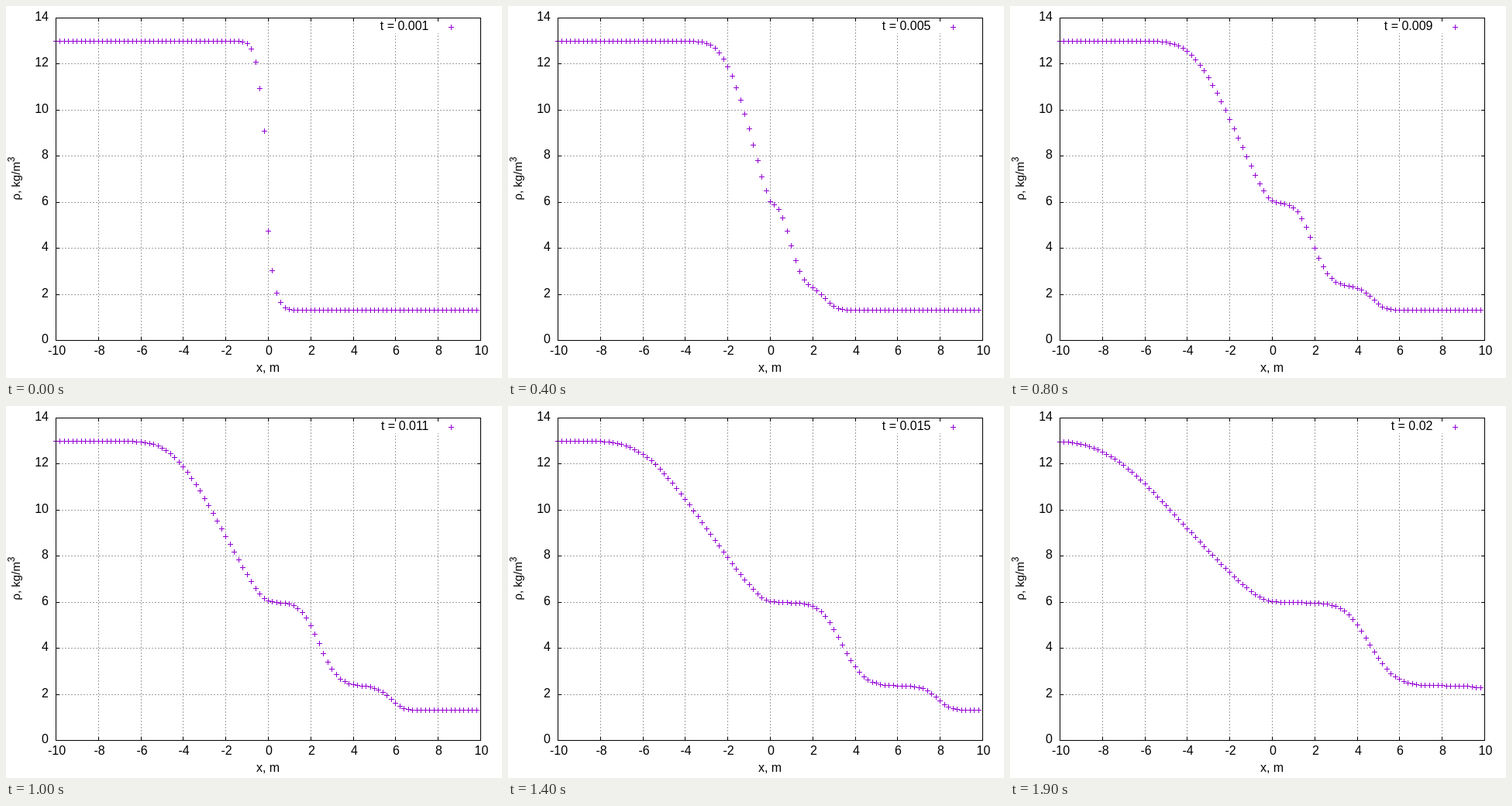
Write an HTML page that moves like this. It is 640 px wide and 480 px high and loops after 2 s.

```html
<!DOCTYPE html>
<html lang="en">
<head>
<meta charset="utf-8">
<title>Shock tube density</title>
<style>
  html, body { margin: 0; width: 100%; height: 100%; overflow: hidden; background: #fff; }
  svg { display: block; }
  text { font: 16px "Liberation Sans", Arial, sans-serif; fill: #000; }
  path { fill: none; stroke-width: 1; shape-rendering: crispEdges; }
  .end { text-anchor: end; }
  .mid { text-anchor: middle; }
  #density { font-size: 15px; }
  #density tspan { font-size: 12px; }
  #grid { stroke: #a0a0a0; stroke-dasharray: 2 2; }
  #axes { stroke: #000; }
  .marks { stroke: #9400d3; }
</style>
</head>
<body>
<svg id="stage" width="640" height="480" viewBox="0 0 640 480">
  <path id="grid"/>
  <path id="key" class="marks"/>
  <path id="points" class="marks"/>
  <path id="axes"/>
  <text class="mid" x="338" y="472">x, m</text>
  <text id="density" transform="translate(18 250.5) rotate(-90)">ρ, kg/m<tspan dy="-7">3</tspan></text>
  <text id="time" class="end" x="545.5" y="31"></text>
</svg>
<script>
const $ = id => document.getElementById(id);
const LEFT = 64, RIGHT = 612, TOP = 15, BOTTOM = 431, TICK = 4;
const px = x => Math.round(LEFT + (x + 10) / 20 * (RIGHT - LEFT));
const py = y => Math.round(BOTTOM - y / 14 * (BOTTOM - TOP));

const hline = (x1, x2, y) => `M${x1} ${y + .5}H${x2}`;
const vline = (x, y1, y2) => `M${x + .5} ${y1}V${y2}`;
const plus = (x, y) => hline(x - 3, x + 4, y) + vline(x, y - 3, y + 4);

function label(text, x, y, anchor) {
  const node = document.createElementNS("http://www.w3.org/2000/svg", "text");
  node.setAttribute("class", anchor);
  node.setAttribute("x", x);
  node.setAttribute("y", y);
  node.textContent = text;
  $("stage").append(node);
}

function drawAxes() {
  let grid = "";
  let axes = `M${LEFT + .5} ${TOP + .5}H${RIGHT + .5}V${BOTTOM + .5}H${LEFT + .5}Z`;
  for (let v = -10; v <= 10; v += 2) {
    const x = px(v);
    axes += vline(x, BOTTOM - TICK, BOTTOM) + vline(x, TOP, TOP + 1 + TICK);
    // grid lines stop below the legend
    if (Math.abs(v) < 10) grid += vline(x, BOTTOM + 1, v === 6 || v === 8 ? 35 : TOP);
    label(v, x + 1.5, 450, "mid");
  }
  for (let v = 0; v <= 14; v += 2) {
    const y = py(v);
    axes += hline(LEFT, LEFT + 1 + TICK, y) + hline(RIGHT - TICK, RIGHT, y);
    if (v > 0 && v < 14) grid += hline(LEFT, RIGHT, y);
    label(v, 55, y + 4, "end");
  }
  $("grid").setAttribute("d", grid);
  $("axes").setAttribute("d", axes);
  $("key").setAttribute("d", plus(574, 27));
}

// Courant-Isaacson-Rees scheme in density r, momentum m and pressure p
const GAMMA = 5 / 3, NODES = 100, DX = 0.2, DT = 1e-5;

function step(gas) {
  const next = gas.slice();
  for (let i = 1; i < NODES - 1; i++) {
    const { r, m, p } = gas[i];
    const u = m / r, c = Math.sqrt(GAMMA * p / r);
    const shift = (speed, wave) => {
      const a = speed > 0 ? gas[i - 1] : gas[i];
      const b = speed > 0 ? gas[i] : gas[i + 1];
      return -speed * DT / DX * wave(b.r - a.r, b.m - a.m, b.p - a.p);
    };
    const right = shift(u + c, (dr, dm, dp) => dp + c * (dm - u * dr));
    const left = shift(u - c, (dr, dm, dp) => dp - c * (dm - u * dr));
    const entropy = shift(u, (dr, dm, dp) => dr - dp / (c * c));
    const dp = (right + left) / 2;
    const dr = entropy + dp / (c * c);
    next[i] = { r: r + dr, m: m + u * dr + (right - left) / (2 * c), p: p + dp };
  }
  next[0] = next[1];
  next[NODES - 1] = next[NODES - 2];
  return next;
}

function simulate(count, stepsEach) {
  let gas = Array.from({ length: NODES }, (_, i) =>
    i < NODES / 2 ? { r: 13, m: 0, p: 1e6 } : { r: 1.3, m: 0, p: 1e5 });
  return Array.from({ length: count }, () => {
    for (let n = 0; n < stepsEach; n++) gas = step(gas);
    return gas.map((g, i) => plus(px(-10 + i * DX), py(g.r))).join("");
  });
}

drawAxes();
const curves = simulate(20, 100);
const start = performance.now();
let shown = -1;

function draw() {
  const n = Math.floor(Math.max(0, performance.now() - start) / 100) % curves.length;
  if (n !== shown) {
    shown = n;
    $("points").setAttribute("d", curves[n]);
    $("time").textContent = "t = " + (n + 1) / 1000;
  }
  requestAnimationFrame(draw);
}
draw();
</script>
</body>
</html>
```
